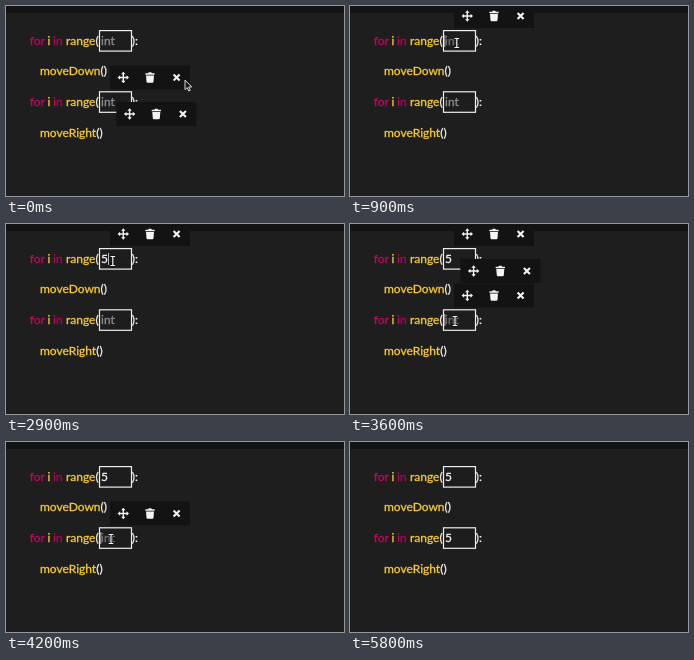
Recreate the animation shown at these times as an HTML page. Size 338 by 190 pixels, loop 7100 ms.

```html
<!DOCTYPE html>
<html lang="en">
<head>
<meta charset="utf-8">
<title>Code block editor</title>
<style>
html, body { margin: 0; width: 100%; height: 100%; overflow: hidden; background: #1e1e1e; }
svg { display: block; width: 100vw; height: 100vh; }
text { font: 12px Lato, sans-serif; fill: #f2f2f2; stroke: #f2f2f2; stroke-width: .3; white-space: pre; }
.key { fill: #c80062; stroke: #c80062; }
.in { fill: #b4005a; stroke: #b4005a; }
.name { fill: #f8cc30; stroke: #f8cc30; }
</style>
</head>
<body>
<svg viewBox="0 0 338 190">
  <defs>
    <g id="loop">
      <text y="38.6"><tspan class="key" x="23.7">for</tspan><tspan class="name" x="41.4">i</tspan><tspan class="in" x="47">in</tspan><tspan class="name" x="60">range</tspan><tspan x="89.6">(</tspan><tspan x="125.8">):</tspan></text>
      <rect x="93.5" y="24.6" width="32" height="20.5" fill="#1d1d1d" stroke="#ededed" stroke-width="1.2"/>
    </g>
    <g id="bar">
      <rect x="-40" y="-12" width="80" height="24" fill="#131313"/>
      <g fill="#f4f4f4">
        <g transform="translate(-26.7 0)">
          <path d="M-4 0H4M0-4V4" stroke="#f4f4f4" stroke-width="1.4"/>
          <path d="M0-5.7l2.2 2.5h-4.4zM0 5.7l2.2-2.5h-4.4zM-5.7 0l2.5 2.2v-4.4zM5.7 0l-2.5 2.2v-4.4z"/>
        </g>
        <path d="M-4.6-4.3h2.7l.7-1h2.4l.7 1h2.7v1.5h-9.2zM-4-2.1h8l-.5 6.4q-.1 1-1.1 1h-4.8q-1 0-1.1-1z"/>
        <path d="M23.6-3l6 6M29.6-3l-6 6" stroke="#f4f4f4" stroke-width="2.1"/>
      </g>
    </g>
  </defs>
  <rect width="338" height="190" fill="#1e1e1e"/>
  <rect width="338" height="7" fill="#131313"/>
  <use href="#loop"/>
  <use href="#loop" y="61.2"/>
  <text x="34" y="69.1"><tspan class="name">moveDown</tspan>()</text>
  <text x="34" y="130.5"><tspan class="name">moveRight</tspan>()</text>
  <text id="value1" x="95" y="38.6"></text>
  <text id="value2" x="95" y="99.8"></text>
  <path id="caret" d="M0-6V6" stroke="#c8c8c8" stroke-width=".9"/>
  <use id="bar1" href="#bar" x="144" y="10"/>
  <use id="bar2" href="#bar" x="150.3" y="47"/>
  <use id="bar3" href="#bar" x="144" y="71.5"/>
  <use id="bar4" href="#bar" x="150.3" y="108"/>
  <path id="arrow" d="M0 0V9.6L2.2 7.6 3.7 11 5.2 10.3 3.8 7H6.7Z" fill="#151515" stroke="#eee" stroke-width=".9"/>
  <g id="beam" fill="none">
    <path d="M-2.3-4.5H2.3M0-4.5V4.5M-2.3 4.5H2.3" stroke="#111" stroke-width="2.6"/>
    <path d="M-2.3-4.5H2.3M0-4.5V4.5M-2.3 4.5H2.3" stroke="#f4f4f4" stroke-width="1.2"/>
  </g>
</svg>
<script>
const LOOP = 7100, STEP = 100;
const $ = id => document.getElementById(id);
const clamp = v => Math.min(1, Math.max(0, v));
const ramp = (t, a, b) => clamp((t - a) / (b - a));
const show = (id, alpha) => $(id).setAttribute('opacity', +alpha);
const place = (id, x, y) => $(id).setAttribute('transform', `translate(${x} ${y})`);

// Pointer stops: time, x, y
const path = [
  [0, 179, 74], [100, 164, 67], [300, 112, 44], [400, 105, 41], [800, 106.8, 37],
  [3100, 106.8, 37], [3500, 105, 97], [5200, 105, 97], [5700, 116, 198], [LOOP, 116, 198]
];
function pointer(t) {
  const k = path.findIndex((p, n) => n && t <= p[0]);
  const [t0, x0, y0] = path[k - 1], [t1, x1, y1] = path[k];
  const u = ramp(t, t0, t1), e = u * u * (3 - 2 * u);
  return [x0 + (x1 - x0) * e, y0 + (y1 - y0) * e];
}

function field(id, typed, focused) {
  const { style } = $(id);
  $(id).textContent = typed ? '5' : 'int';
  style.fill = style.stroke = typed ? '#f4f4f4' : focused ? '#6e6e6e' : '#8c8c8c';
}

function draw(t) {
  const [x, y] = pointer(t);
  const inside = x > 93 && x < 126 && ((y > 25 && y < 46) || (y > 86 && y < 107));
  place('arrow', x, y);
  place('beam', x, y);
  show('arrow', !inside);
  show('beam', inside);

  field('value1', t >= 2900, t >= 400);
  field('value2', t >= 5100, t >= 3500);

  const first = t >= 800 && t < 2000, typed = t >= 2900 && t < 3200;
  const second = t >= 3600 && t < 5100;
  place('caret', typed ? 102.5 : 94.8, second ? 96 : 35);
  show('caret', first || typed || second);

  show('bar1', ramp(t, 100, 400) * (1 - ramp(t, 3600, 3900)));
  show('bar2', ramp(t, 3200, 3400) * (1 - ramp(t, 3600, 3900)));
  show('bar3', t < 2000 ? 1 - ramp(t, 400, 800) : ramp(t, 3300, 3600) * (1 - ramp(t, 5300, 5800)));
  show('bar4', 1 - ramp(t, 0, 300));
}

const start = performance.now();
function frame() {
  const t = (performance.now() - start) % LOOP;
  draw(Math.floor(t / STEP) * STEP);
  requestAnimationFrame(frame);
}
frame();
</script>
</body>
</html>
```
